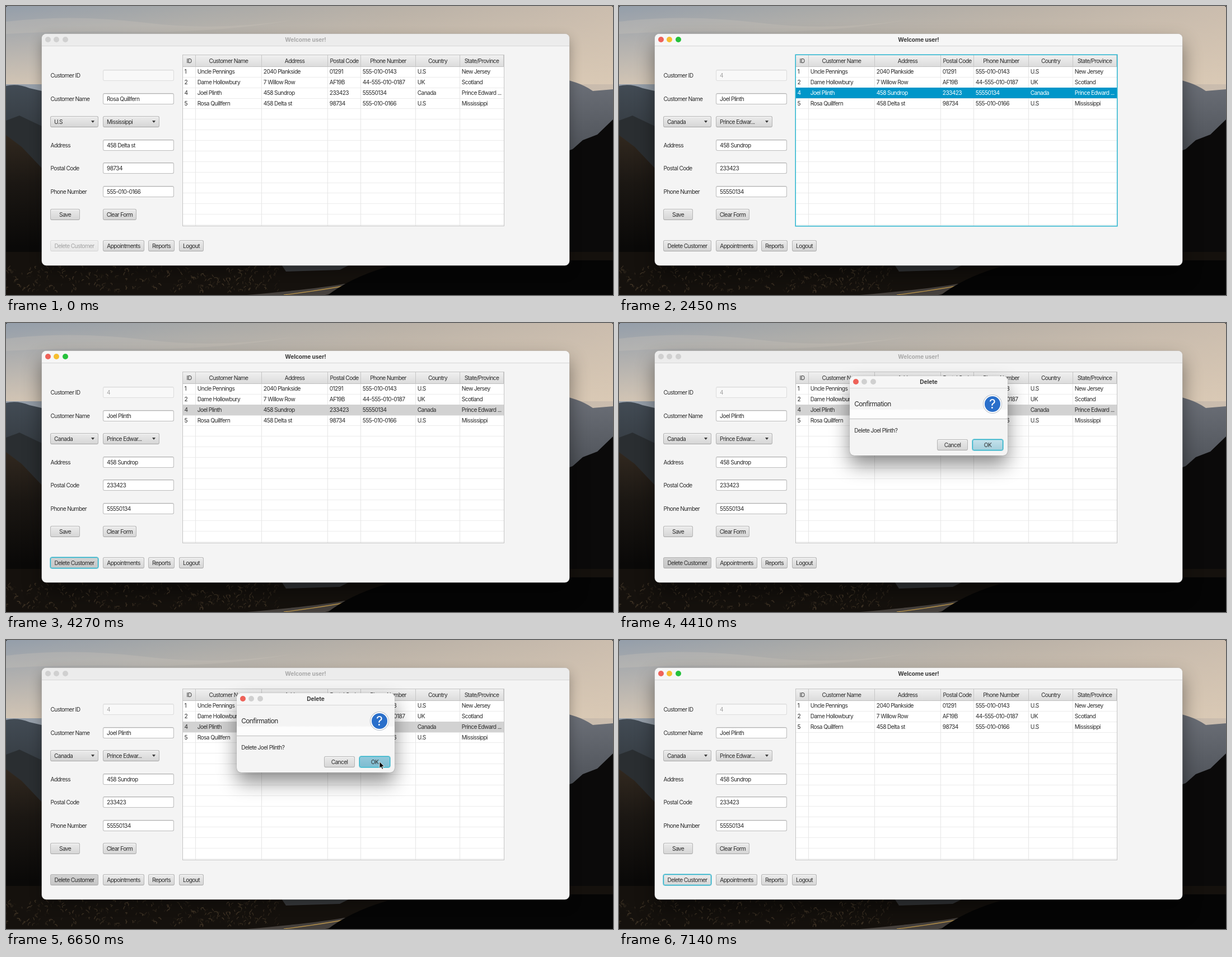
Write an HTML page that moves like this. It is 1084 px wide and 517 px high and loops after 8610 ms.

```html
<!DOCTYPE html>
<html lang="en">
<head>
<meta charset="utf-8">
<title>Customer form</title>
<style>
html, body { margin: 0; width: 100%; height: 100%; overflow: hidden; background: #000; }
#stage { position: relative; width: 1084px; height: 517px; overflow: hidden;
  font: 10.2px Inter, "Liberation Sans", sans-serif; letter-spacing: -.63px; color: #2b2b2b; }
#stage div { position: absolute; box-sizing: border-box; white-space: pre; }
#stage > svg { position: absolute; left: 0; top: 0; }
#scene { border-radius: 3px 3px 0 0; }

.window { border-radius: 8px; background: #f4f4f4; box-shadow: 0 0 0 .5px rgba(190,190,190,.8), 0 9px 22px rgba(0,0,0,.32); }
.bar { border-radius: 8px 8px 0 0; background: #ececec; border-bottom: 1px solid #d6d6d6;
  font-weight: 700; letter-spacing: -.1px; text-align: center; color: #a9a9a9; }
.light { border-radius: 50%; background: #d0d0d0; }
.lift .main { box-shadow: 0 0 0 .5px rgba(190,190,190,.8), 0 17px 34px rgba(0,0,0,.45); }
.popup { box-shadow: 0 0 1px rgba(0,0,0,.5), 0 17px 34px rgba(0,0,0,.45); visibility: hidden; }
.dialog .popup { visibility: visible; }
.active .mainBar, .popupBar { background: #f6f6f6; color: #3a3a3a; }
.active .l0, .p0 { background: #ee6259; }
.active .l1 { background: #f6be2f; }
.active .l2 { background: #25c13b; }

.button { border: 1px solid #b4b4b4; border-bottom-color: #a6a6a6; border-radius: 3px; text-align: center;
  background: linear-gradient(#ebebeb, #d6d6d6); box-shadow: inset 0 1px 0 #f8f8f8; }
.combo { text-align: left; padding-left: 6px; }
.combo::after { content: ""; position: absolute; right: 6px; top: 7px;
  border: 3.5px solid transparent; border-top: 4px solid #3b3b3b; border-bottom: 0; }
.hot { background: linear-gradient(#f8f8f8, #e9e9e9); }
.down { background: linear-gradient(#d2d2d2, #c6c6c6); box-shadow: none; }
.ring { border-color: #2ab0c8; box-shadow: 0 0 0 .5px #2ab0c8, inset 0 0 0 .5px #8ad3e0; }
.off { opacity: .4; }
.ok { background: linear-gradient(#c4e2ec, #a5cedb); }
.ok.hot { background: linear-gradient(#d2eaf1, #b5d9e4); }
.ok.down { background: linear-gradient(#93c9db, #7dbbd0); }
.field { background: #fff; border: 1px solid #bdbdbd; border-top-color: #b0b0b0; border-radius: 3px;
  padding-left: 6px; box-shadow: inset 0 1px 1px #e6e6e6; }

.table { background: #fff; border: 1px solid #c4c4c4; }
.head { background: linear-gradient(#f0f0f0, #dcdcdc); border-right: 1px solid #c6c6c6;
  border-bottom: 1px solid #c0c0c0; text-align: center; }
.hline { height: 1px; background: #ececec; }
.vline { width: 1px; background: #e6e6e6; }
.rim { border: 1px solid #2ab5cf; box-shadow: 0 0 0 .7px #5cc5d8; visibility: hidden; }
.focus .rim { visibility: visible; }
.picked .r2 { background: #d2d2d2; }
.focus .r2 { background: #0096c9; color: #fff; }
.gone .r2 { visibility: hidden; }
.gone .r3 { transform: translateY(-18.87px); }

.banner { background: linear-gradient(#f4f4f4 68%, #fdfdfd 72%); border-bottom: 1px solid #bcbcbc; }
.big { font-size: 11.9px; }
.badge { border-radius: 50%; background: #2a6fca; border: 2px solid #fff; box-shadow: 0 0 0 1px #b9c0c8;
  color: #fff; text-align: center; font-size: 23px; letter-spacing: 0; }
#pointer { visibility: hidden; }
</style>
</head>
<body>
<div id="stage">
  <svg id="scene" width="1084" height="517">
    <defs>
      <linearGradient id="sky"><stop stop-color="#949eaa"/><stop offset=".3" stop-color="#a6a8a8"/>
        <stop offset=".65" stop-color="#b9b1a7"/><stop offset="1" stop-color="#cbbdae"/></linearGradient>
      <linearGradient id="glow" x2="0" y2="1"><stop stop-color="#dccbb6" stop-opacity="0"/>
        <stop offset="1" stop-color="#dccbb6" stop-opacity=".85"/></linearGradient>
      <linearGradient id="far" x2="0" y2="1"><stop stop-color="#424b54"/><stop offset="1" stop-color="#25282b"/></linearGradient>
      <linearGradient id="slope" x2="0" y2="1"><stop stop-color="#31281f"/><stop offset=".3" stop-color="#1b1713"/>
        <stop offset=".7" stop-color="#0a0908"/></linearGradient>
      <linearGradient id="haze" x2="0" y2="1"><stop stop-color="#6d7179"/><stop offset="1" stop-color="#45494f"/></linearGradient>
    </defs>
    <rect width="1084" height="517" fill="url(#sky)"/>
    <rect width="1084" height="140" fill="url(#glow)"/>
    <path d="M0 28Q120 14 250 30T520 24Q380 48 240 46T0 50Z" fill="#c9c3bb" opacity=".3"/>
    <path d="M0 143Q20 138 42 147L90 158V330H0Z" fill="url(#far)"/>
    <path d="M0 205L24 196 64 215 90 230V320H0Z" fill="#2a2e31"/>
    <path d="M0 231L28 252 64 290 110 330V517H0Z" fill="url(#slope)"/>
    <path d="M980 128Q1022 134 1048 152L1084 149V300H980Z" fill="url(#haze)"/>
    <path d="M980 268L1012 256 1030 240 1056 230 1084 203V517H980Z" fill="#0b0a0a"/>
    <rect y="440" width="1084" height="77" fill="#15110d"/>
    <path d="M490 460H620L596 472 500 475Z" fill="#393b3e"/>
    <g id="brush" fill="none" stroke-width="1.2"></g>
    <path d="M430 517Q556 506 604 497L630 499Q600 511 570 517Z" fill="#46413d"/>
    <path d="M496 517Q565 508 608 500" fill="none" stroke="#b8934a" stroke-width="1.4"/>
    <path d="M575 517Q620 483 690 464L720 455H1084V517Z" fill="#050505"/>
  </svg>
</div>
<script>
const LOOP = 8610, PITCH = 18.87;
const stage = document.getElementById('stage');

function box(parent, cls, x, y, w, h, text = '') {
  const el = document.createElement('div');
  el.className = cls;
  el.style.cssText = `left:${x}px;top:${y}px;width:${w}px;height:${h}px;line-height:${h - 2}px`;
  el.textContent = text;
  parent.append(el);
  return el;
}
const label = (parent, x, mid, text, cls = '') => box(parent, cls, x, mid - 9, 150, 20, text);

function frame(name, light, x, y, w, h, title) {
  const win = box(stage, 'window ' + name, x, y, w, h);
  const bar = box(win, `bar ${name}Bar`, 0, 0, w, 22, title);
  for (let i = 0; i < 3; i++) box(bar, `light ${light}${i}`, 5.6 + i * 15.75, 5.4, 10, 10);
  return win;
}

// Dry grass along the lower edge
let seed = 7;
const rand = () => (seed = seed * 16807 % 2147483647) / 2147483647;
let tufts = '';
for (let i = 0; i < 320; i++) {
  const x = rand() * 490, y = 468 + rand() * 46, tone = 24 + rand() * 48;
  tufts += `<path d="M${x} ${y}q${rand() * 8 - 4} -4 ${rand() * 12 - 6} -${2 + rand() * 4}" stroke="rgb(${tone},${tone * .82},${tone * .6})"/>`;
}
document.getElementById('brush').innerHTML = tufts;

frame('main', 'l', 64, 50, 942, 414, 'Welcome user!');

const rows = [
  ['1', 'Uncle Pennings', '2040 Plankside', '01291', '555-010-0143', 'U.S', 'New Jersey'],
  ['2', 'Dame Hollowbury', '7 Willow Row', 'AF19B', '44-555-010-0187', 'UK', 'Scotland'],
  ['4', 'Joel Plinth', '458 Sundrop', '233423', '55550134', 'Canada', 'Prince Edward ...'],
  ['5', 'Rosa Quillfern', '458 Delta st', '98734', '555-010-0166', 'U.S', 'Mississippi']
];
const heads = ['ID', 'Customer Name', 'Address', 'Postal Code', 'Phone Number', 'Country', 'State/Province'];
const edges = [316, 339, 457, 575, 634, 732, 811, 889];

// Form
const field = (mid, cls = '') => box(stage, 'field ' + cls, 173, mid - 10, 127, 20);
const button = (x, y, w, text, cls = '') => box(stage, 'button ' + cls, x, y, w, 20, text);
[['Customer ID', 124], ['Customer Name', 165.5], ['Address', 248.5], ['Postal Code', 290], ['Phone Number', 331.5]]
  .forEach(([text, mid]) => label(stage, 79.5, mid, text));
const inputs = {
  id: field(124, 'off'), name: field(165.5), address: field(248.5), postal: field(290), phone: field(331.5),
  country: button(79, 197, 86, '', 'combo'), state: button(173, 197, 101, '', 'combo')
};
button(79, 363, 53, 'Save');
const buttons = {
  clear: button(173, 363, 60, 'Clear Form'),
  remove: button(79, 419, 86, 'Delete Customer'),
  visits: button(173, 419, 74, 'Appointments'),
  reports: button(254, 419, 47, 'Reports'),
  logout: button(309, 419, 44, 'Logout')
};

// Table
box(stage, 'table', 315, 87, 575, 307);
heads.forEach((text, i) => box(stage, 'head', edges[i], 88, edges[i + 1] - edges[i], 21, text).style.lineHeight = '21px');
for (let i = 1; i <= 15; i++) box(stage, 'hline', 316, Math.floor(108.5 + i * PITCH), 573, 1);
edges.slice(1, -1).forEach(x => box(stage, 'vline', x - 1, 109, 1, 284));
rows.forEach((row, i) => {
  const line = box(stage, 'r' + i, 316, 108.5 + i * PITCH, 573, PITCH);
  row.forEach((text, c) => label(line, edges[c] - 313.2 + (c ? 0 : -.3), 8.6, text));
});
box(stage, 'rim', 315, 87, 575, 307);

// Confirmation dialog
const popup = frame('popup', 'p', 412, 95, 282, 142, 'Delete');
box(popup, 'banner', 0, 22, 282, 55);
label(popup, 8.3, 49.5, 'Confirmation', 'big');
box(popup, 'badge', 239, 33.5, 32, 32, '?').style.lineHeight = '28px';
label(popup, 8.3, 97.3, `Delete ${rows[2][1]}?`);
box(popup, 'button', 156, 113, 55, 20, 'Cancel');
buttons.ok = box(popup, 'button ok', 219, 113, 55, 20, 'OK');

stage.insertAdjacentHTML('beforeend', `<svg id="pointer" width="14" height="18" viewBox="-1 -1 14 18">
  <path d="M0 0V12L2.8 9.4 4.7 13.8 6.7 12.9 4.8 8.7H8.6Z" fill="#000" stroke="#fff" stroke-width=".9"/></svg>`);
const pointer = document.getElementById('pointer');

// [time, stage classes, button classes, pointer tip]
const picked = 'active lift filled picked focus';
const asking = 'filled picked dialog';
const steps = [
  [0, '', { remove: 'off' }],
  [1190, 'active filled picked focus'],
  [1260, picked],
  [2240, picked, { clear: 'hot' }],
  [2450, picked],
  [2520, picked, { reports: 'hot' }],
  [3010, picked, { logout: 'hot' }],
  [3150, picked, { reports: 'hot' }],
  [3290, picked],
  [3360, picked, { visits: 'hot' }],
  [3430, picked, { remove: 'hot' }],
  [4270, 'active lift filled picked', { remove: 'down ring' }],
  [4410, asking + ' lift', { remove: 'down', ok: 'ring' }],
  [4480, asking, { remove: 'down', ok: 'ring' }, [109, 426]],
  [4830, asking, { remove: 'down', ok: 'ring' }, [113, 427]],
  [4900, asking, { remove: 'down', ok: 'ring' }],
  [5460, asking, { remove: 'down', ok: 'ring hot' }],
  [6580, asking, { remove: 'down', ok: 'ring down' }],
  [6650, asking, { remove: 'down', ok: 'ring down' }, [667, 217.5]],
  [6790, 'active filled gone', { remove: 'down ring' }, [667, 217.5]],
  [6860, 'active lift filled gone', { remove: 'down ring' }, [667, 217.5]],
  [7140, 'active lift filled gone', { remove: 'ring' }]
];

function fillForm(filled) {
  const [id, name, address, postal, phone, country, state] = rows[filled ? 2 : 3];
  const values = { id: filled ? id : '', name, address, postal, phone, country,
    state: state.length > 12 ? state.slice(0, 12) + '...' : state };
  for (const key in values) inputs[key].textContent = values[key];
}

function show([, classes, looks = {}, tip]) {
  stage.className = classes;
  fillForm(classes.includes('filled'));
  for (const key in buttons)
    buttons[key].className = `button ${key === 'ok' ? 'ok ' : ''}${looks[key] || ''}`;
  pointer.style.visibility = tip ? 'visible' : 'hidden';
  if (tip) pointer.style.transform = `translate(${tip[0] - 1}px, ${tip[1] - 1}px)`;
}

const start = performance.now();
let current;
function tick() {
  const t = (performance.now() - start) % LOOP;
  const step = steps.findLast(s => s[0] <= t);
  if (step !== current) show(current = step);
  requestAnimationFrame(tick);
}
tick();
</script>
</body>
</html>
```
